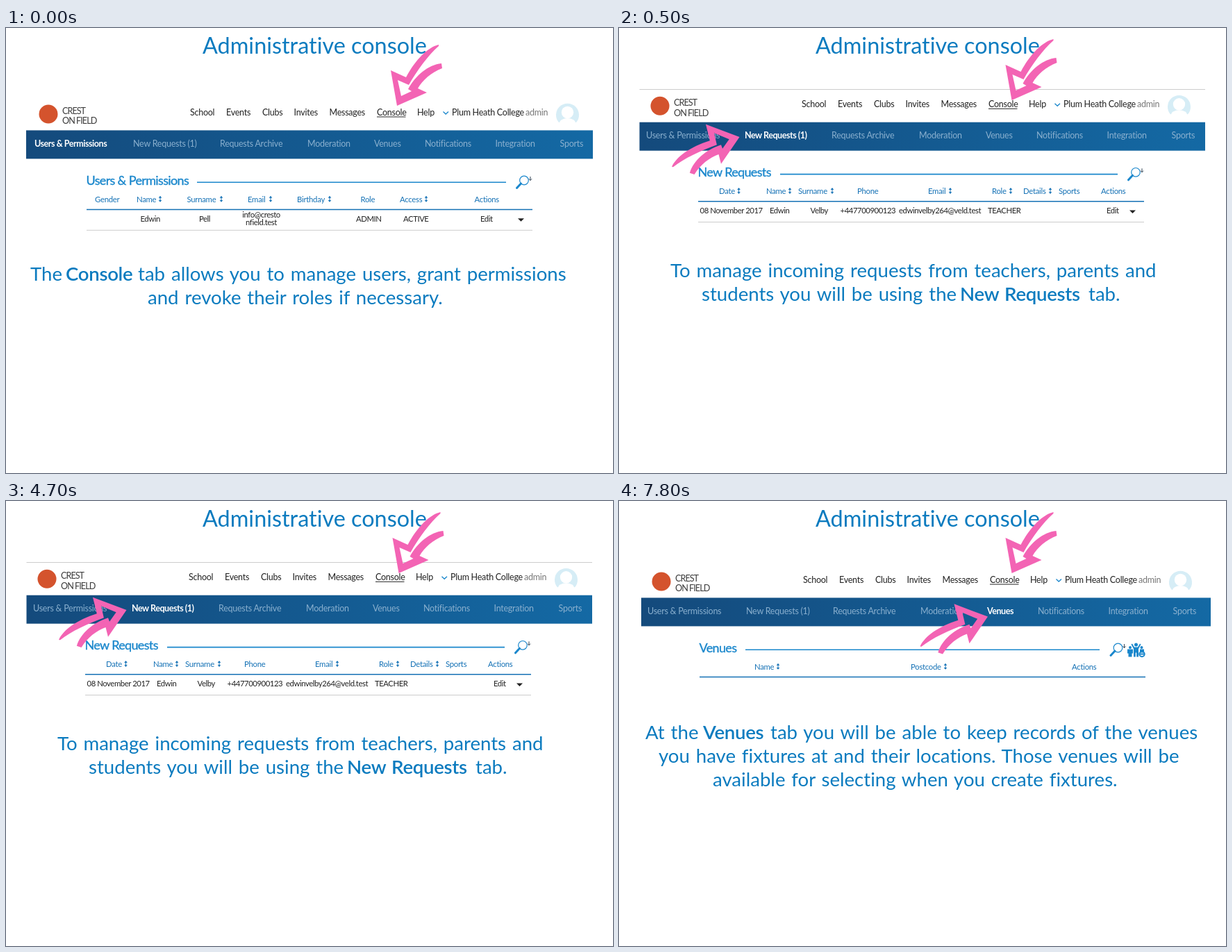
An HTML page for the animation above (8000 ms loop, 874 by 641 pixels).

```html
<!DOCTYPE html>
<html lang="en">
<head>
<meta charset="utf-8">
<title>Administrative console</title>
<style>
html, body { margin: 0; width: 100%; height: 100%; overflow: hidden; background: #fff; }
svg { display: block; width: 874px; height: 641px; font-family: Lato, "Open Sans", sans-serif; font-variant-ligatures: none; }
.title { font-size: 32.4px; fill: #0b7bbf; }
.caption { font-size: 27.6px; fill: #0b7bbf; word-spacing: 1.8px; }
.strong { font-weight: 600; letter-spacing: -.3px; }
.menu, .nav { font-size: 12.5px; letter-spacing: -.25px; fill: #222; }
.nav { fill: #8ab0cf; }
.on { fill: #fff; font-weight: 700; letter-spacing: -.45px; }
.soft { fill: #777; }
.brand { font-size: 12.6px; letter-spacing: -.95px; fill: #3c3c3c; }
.section { font-size: 18px; letter-spacing: -.65px; fill: #1a87cc; stroke: #1a87cc; stroke-width: .35px; }
.head, .cell { font-size: 11.3px; letter-spacing: -.25px; fill: #1471b5; }
.cell { letter-spacing: -.42px; fill: #222; }
.mid { text-anchor: middle; }
</style>
</head>
<body>
<svg id="stage" viewBox="0 0 874 641">
  <defs>
    <linearGradient id="bar" x1="0" y1="0" x2="1" y2="0">
      <stop offset="0" stop-color="#144a7c"/>
      <stop offset="1" stop-color="#1469a4"/>
    </linearGradient>
    <!-- hollow arrow with its tip at the origin -->
    <path id="arrow" fill="#f364b4" d="M60-88C44-84 27-67 13-41L-9-51L0 0L43-19L30-25C37-37 49-48 65-54L64-61C45-59 27-44 16-24L21-21L6-14L1-37L17-30C29-51 45-73 60-86Z"/>
    <path id="sort" fill="#1471b5" d="M0-4.5L2.3-1.6H.5V1.6H2.3L0 4.5L-2.3 1.6H-.5V-1.6H-2.3Z"/>
    <g id="search" fill="none" stroke="#1a87cc">
      <circle r="6.3" stroke-width="1.2"/>
      <path d="M-4.5 4.5L-10.5 11" stroke-width="3" stroke-linecap="round"/>
      <path d="M9-5.5V0M7-2.2L9 0L11-2.2" stroke="#345" stroke-width="1"/>
    </g>
    <g id="people" fill="#1a87cc">
      <circle cx="5" cy="6.5" r="2"/><path d="M1 9H9V15H7.5V20H2.5V15H1Z"/>
      <circle cx="13.5" cy="2.5" r="2.5"/><path d="M8 1L11 6H16L19 1L20.5 2L17 8.5V20H14.2V14H12.8V20H10V8.5L6.5 2Z"/>
      <circle cx="21.5" cy="6.5" r="2"/><path d="M19 9H25V14H19Z"/>
      <circle cx="22" cy="16" r="3.7" fill="none" stroke="#1a87cc" stroke-width="2"/>
      <path d="M19 15H25V17H19Z"/>
    </g>
  </defs>
  <text class="title" x="283" y="37">Administrative console</text>
</svg>
<script>
const LOOP = 8000;
const stage = document.getElementById("stage");

const MENU = [[265, "School"], [317, "Events"], [369, "Clubs"], [414.5, "Invites"],
  [465.5, "Messages"], [534, "Console"], [592, "Help"], [642, "Plum Heath College"]];
const TABS = [[41, "Users & Permissions"], [183, "New Requests (1)"], [308, "Requests Archive"],
  [434, "Moderation"], [530, "Venues"], [603, "Notifications"], [704.5, "Integration"], [797.5, "Sports"]];

// heads: [x, label, x of the sort mark]; cells: [x, text]; lines: [y, ...[x, text, strong]]
const SLIDES = [
  {
    start: 0, shift: [0, 0], bar: [29, 816], tab: 0,
    section: "Users & Permissions", rule: [275, 720], lens: 746,
    heads: [[128, "Gender"], [188, "Name", 222], [260.5, "Surname", 310], [348, "Email", 381],
      [419, "Birthday", 466], [510.5, "Role"], [567, "Access", 605], [674.5, "Actions"]],
    cells: [[193.5, "Edwin"], [278, "Pell"], [504, "ADMIN"], [572, "ACTIVE"], [683, "Edit"]],
    email: ["info@cresto", "nfield.test"], menuMark: 741.5,
    lines: [[364, [35, "The"], [86, "Console", 1], [190, "tab allows you to manage users, grant permissions"]],
      [398, [204, "and revoke their roles if necessary."]]],
    pointers: [[563, 112]]
  },
  {
    start: 500, shift: [-2, -11.7], bar: [31.5, 814.5], tab: 1, topLine: true,
    section: "New Requests", rule: [234, 720], lens: 746,
    heads: [[146, "Date", 174.5], [214, "Name", 248], [260, "Surname", 309], [345, "Phone"],
      [447, "Email", 479], [539, "Role", 566], [584, "Details", 623], [635, "Sports"], [696, "Actions"]],
    cells: [[118.5, "08 November 2017"], [219, "Edwin"], [277.5, "Velby"], [320.5, "+447700900123"],
      [405, "edwinvelby264@veld.test"], [533, "TEACHER"], [704, "Edit"]],
    menuMark: 741.5,
    lines: [[359, [74, "To manage incoming requests from teachers, parents and"]],
      [393, [119, "students you will be using the"], [491, "New Requests", 1], [676, "tab."]]],
    pointers: [[565.5, 104], [173.5, 157, 1]]
  },
  {
    start: 7500, shift: [0, -8], bar: [32, 820], tab: 4,
    section: "Venues", rule: [182, 692], lens: 718.5, people: true,
    heads: [[195, "Name", 229], [420, "Postcode", 470], [652, "Actions"]],
    cells: [],
    lines: [[343, [38, "At the"], [121, "Venues", 1], [218, "tab you will be able to keep records of the venues"]],
      [377, [57, "you have fixtures at and their locations. Those venues will be"]],
      [411, [135, "available for selecting when you create fixtures."]]],
    pointers: [[565.5, 104], [531, 166.5, 1]]
  }
];

function add(parent, tag, attrs, text) {
  const el = document.createElementNS("http://www.w3.org/2000/svg", tag);
  for (const key in attrs) el.setAttribute(key, attrs[key]);
  if (text) el.textContent = text;
  parent.appendChild(el);
  return el;
}
const write = (g, cls, x, y, text) => add(g, "text", { class: cls, x, y }, text);
const put = (g, id, x, y) => add(g, "use", { href: "#" + id, transform: `translate(${x} ${y})` });
const rule = (g, x1, x2, y, stroke, width) =>
  add(g, "path", { d: `M${x1} ${y}H${x2}`, stroke, "stroke-width": width });

function drawHeader(g, slide) {
  add(g, "circle", { cx: 61, cy: 124, r: 13.5, fill: "#d4532d" });
  write(g, "brand", 81, 124, "CREST");
  write(g, "brand", 81, 138.3, "ON FIELD");
  MENU.forEach(([x, label]) => write(g, "menu", x, 125.7, label));
  write(g, "menu soft", 748, 125.7, "admin");
  rule(g, 534, 575.5, 128, "#222", 1);
  add(g, "path", { d: "M629.5 120.5L633.2 124L637 120.5", fill: "none", stroke: "#1a87cc", "stroke-width": 1.3 });
  add(g, "path", { d: "M796 136A16.5 16.5 0 1 1 821 136Z", fill: "#d6edf6" });
  add(g, "circle", { cx: 808.5, cy: 121.5, r: 8.7, fill: "#fff" });
  add(g, "ellipse", { cx: 808.5, cy: 137, rx: 11.5, ry: 7, fill: "#fff" });

  const [x, width] = slide.bar;
  if (slide.topLine) rule(g, x, x + width, 100.2, "#ccc", 1);
  add(g, "rect", { x, y: 147.4, width, height: 41, fill: "url(#bar)" });
  TABS.forEach(([tx, label], i) => write(g, i === slide.tab ? "nav on" : "nav", tx, 171, label));
}

function drawTable(g, slide) {
  write(g, "section", 115.5, 226, slide.section);
  rule(g, ...slide.rule, 222.3, "#1a87cc", 1.6);
  put(g, "search", slide.lens, 219.5);
  if (slide.people) put(g, "people", 731, 212.5);
  slide.heads.forEach(([x, label, mark]) => {
    write(g, "head", x, 250.5, label);
    if (mark) put(g, "sort", mark, 246.3);
  });
  rule(g, 116, 758, 261.5, "#1471b5", 1.6);
  slide.cells.forEach(([x, text]) => write(g, "cell", x, 278.7, text));
  (slide.email || []).forEach((part, i) => write(g, "cell mid", 367.5, 273 + 11 * i, part));
  if (slide.menuMark) {
    add(g, "path", { d: `M${slide.menuMark - 4.5} 274.3h9l-4.5 4.5Z`, fill: "#222" });
    rule(g, 116, 758, 291.3, "#ccc", 1);
  }
}

function drawSlide(slide) {
  const g = add(stage, "g", {});
  const panel = add(g, "g", { transform: `translate(${slide.shift})` });
  drawHeader(panel, slide);
  drawTable(panel, slide);
  slide.lines.forEach(([y, ...runs]) => runs.forEach(([x, text, strong]) =>
    write(g, strong ? "caption strong" : "caption", x, y, text)));
  // the second pointer is a mirrored, turned copy
  slide.pointers.forEach(([x, y, turned]) => add(g, "use", {
    href: "#arrow",
    transform: `translate(${x} ${y})` + (turned ? " rotate(100.5) scale(1 -1)" : "")
  }));
  return g;
}

const groups = SLIDES.map(drawSlide);
const begin = performance.now();

function show(now) {
  const t = Math.max(0, now - begin) % LOOP;
  const current = SLIDES.findLastIndex(slide => t >= slide.start);
  groups.forEach((g, i) => g.setAttribute("visibility", i === current ? "visible" : "hidden"));
  requestAnimationFrame(show);
}
show(begin);
</script>
</body>
</html>
```
